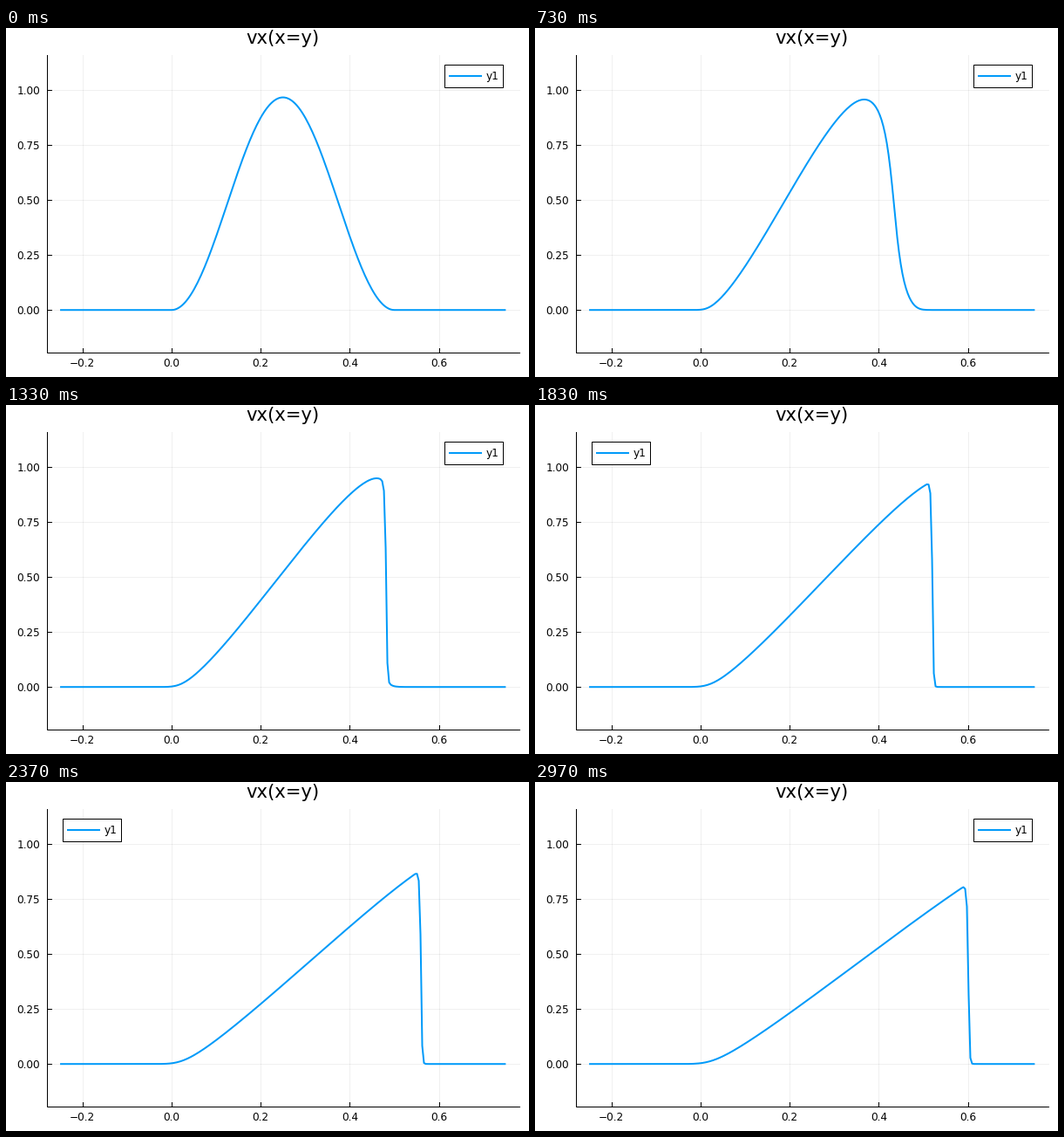
These frames come from a looping animation (600 by 400 pixels, 3.01 s). A matplotlib script:

```python
import numpy as np
import matplotlib.pyplot as plt
from matplotlib.animation import FuncAnimation
from matplotlib.patches import Rectangle

W, H, DPI = 600, 400, 100
PT = 72 / DPI
BLUE = "#009AF9"
plt.rcParams["font.family"] = "DejaVu Sans"

# Viscous Burgers flow with vx = vy, solved on a square and cut along x = y
CELLS, SUBSTEPS, STEPS = 256, 6, 90
STEP_TIME, NU, AMP = 0.0056, 0.001, 0.967
h = 1 / CELLS
dt = STEP_TIME / SUBSTEPS
xs = np.linspace(-0.25, 0.75, CELLS + 1)


def one_way(u):
    """Upwind flux and diffusion along the first axis."""
    fwd = np.roll(u, -1, 0) - u
    back = np.roll(fwd, 1, 0)
    eps = 1e-5
    a2, b2 = back * back + eps, fwd * fwd + eps
    slope = (back * b2 + fwd * a2) / (a2 + b2)
    flux = (u + slope / 2) ** 2 / 2
    return (np.roll(flux, 1, 0) - flux) / h + NU * (fwd - back) / h**2


def rate(u):
    r = one_way(u)
    return r + r.T


def solve():
    bump = np.where((xs > 0) & (xs < 0.5), np.sin(2 * np.pi * xs), 0)
    u = AMP * np.outer(bump, bump)
    cuts = [u.diagonal().copy()]
    for _ in range(STEPS - 1):
        for _ in range(SUBSTEPS):
            k1 = rate(u)
            k2 = rate(u + dt * k1)
            u = u + dt * (k1 + k2) / 2
        cuts.append(u.diagonal().copy())
    return cuts


def px(x):
    return 189.9 + 511.3 * x


def py(v):
    return 323.2 - 252 * v


cuts = solve()

fig = plt.figure(figsize=(W / DPI, H / DPI), dpi=DPI, facecolor="white")
ax = fig.add_axes([0, 0, 1, 1])
ax.set(xlim=(0, W), ylim=(H, 0))
ax.axis("off")

LEFT, RIGHT, TOP, BOTTOM = 46.5, 588.5, 30.5, 371.5


def line(x, y, width=1, color="black", **kw):
    return ax.plot(x, y, color=color, lw=width * PT, **kw)[0]


def label(x, y, text, size=12.1, ha="center"):
    return ax.text(x, y, text, fontsize=size * PT, ha=ha, va="baseline")


for v in (-0.2, 0, 0.2, 0.4, 0.6):
    x = px(v)
    line([x, x], [TOP, BOTTOM], alpha=0.06)
    line([x, x], [BOTTOM, BOTTOM - 5], zorder=3)
    label(x, 388, f"{v:.1f}".replace("-", "\u2212"))

for v in (0, 0.25, 0.5, 0.75, 1):
    y = py(v)
    line([LEFT, RIGHT], [y, y], alpha=0.06)
    line([LEFT, LEFT + 5], [y, y], zorder=3)
    label(39, y + 4.4, f"{v:.2f}", ha="right")

line([LEFT, LEFT, RIGHT], [TOP, BOTTOM, BOTTOM], zorder=3, solid_joinstyle="miter")
label(317.8, 18, "vx(x=y)", 21.2)

curve = line(px(xs), py(cuts[0]), 2, BLUE, zorder=4, solid_capstyle="butt")

# Legend, placed by its left edge
LEG_RIGHT, LEG_LEFT = 502.5, 64.5
box = Rectangle((LEG_RIGHT, 42.0), 67.7, 26.2, fc="white", ec="black",
                lw=PT, zorder=5)
ax.add_patch(box)
key = line([0, 0], [55.2, 55.2], 2, BLUE, zorder=6, solid_capstyle="butt")
name = label(0, 59.5, "y1", ha="left")
name.set_zorder(6)


def draw(tick):
    # Steps last a thirtieth of a second, rounded to 10 ms
    step = min((30 * tick + 15) // 100, STEPS - 1)
    curve.set_ydata(py(cuts[step]))
    x = LEG_LEFT if 49 <= step < 81 else LEG_RIGHT
    box.set_x(x)
    key.set_xdata([x + 5.5, x + 43])
    name.set_x(x + 47.8)
    return curve, box, key, name


anim = FuncAnimation(fig, draw, frames=301, interval=10, repeat=True,
                     repeat_delay=0, blit=False)
plt.show()
```
